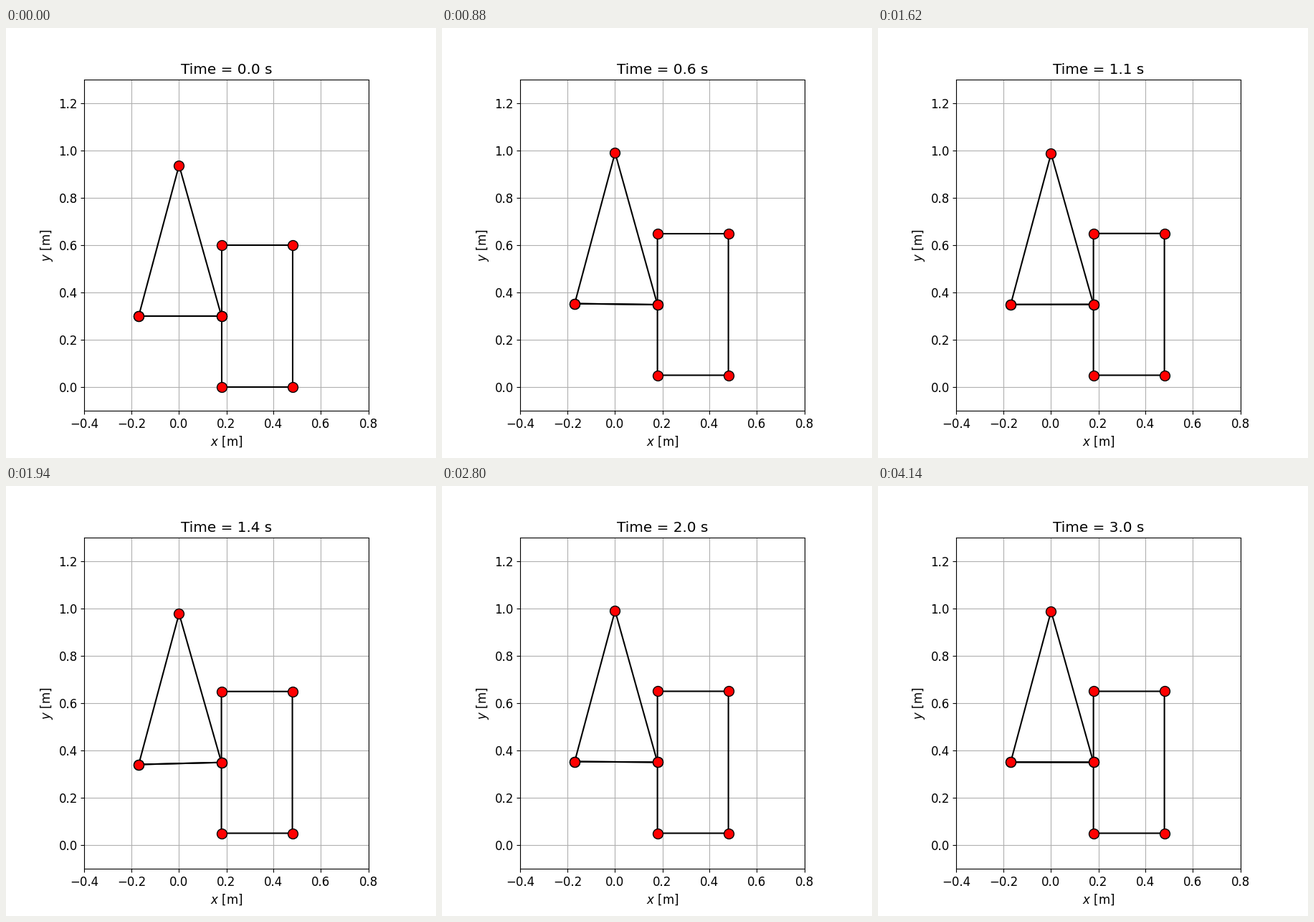
These frames come from a looping animation (600 px wide and 600 px high, 4.16 s). A matplotlib script:

```python
import numpy as np
import matplotlib.pyplot as plt
from matplotlib.animation import FuncAnimation

STEP_MS, LOOP_MS = 20, 4160

# Geometry [m]
STRUT, TILT, ARM = 0.66, np.radians(15), 0.35
PIVOT_X, MAST = -STRUT * np.sin(TILT), STRUT * np.cos(TILT)
RADIUS, WIDTH = 0.3, 0.3
BUMP, BUMP_TIME = 0.05, 0.315

# Quarter car: masses [kg], stiffness [N/m], damping [Ns/m]
BODY, WHEEL = 300.0, 51.0
SPRING, DAMPER, TYRE = 10880.0, 1135.0, 150000.0

# Linear system for (body, hub, body velocity, hub velocity)
SYSTEM = np.array([
    [0, 0, 1, 0],
    [0, 0, 0, 1],
    [-SPRING / BODY, SPRING / BODY, -DAMPER / BODY, DAMPER / BODY],
    [SPRING / WHEEL, -(SPRING + TYRE) / WHEEL, DAMPER / WHEEL, -DAMPER / WHEEL],
])
RATES, MODES = np.linalg.eig(SYSTEM)
WEIGHTS = np.linalg.solve(MODES, np.array([-BUMP, -BUMP, 0, 0], dtype=complex))


def sim_time(frame):
    """Simulated seconds; playback is slower before the bump."""
    t = np.interp(frame * STEP_MS, [0, 280, 480, 4140], [0, 0.151, 0.255, 3.0])
    return round(float(t), 6)


def heights(t):
    """Road, body pivot and hub height."""
    if t < BUMP_TIME - 1e-9:
        return 0.0, RADIUS, RADIUS
    offset = (MODES @ (WEIGHTS * np.exp(RATES * (t - BUMP_TIME)))).real
    rest = RADIUS + BUMP
    return BUMP, rest + offset[0], rest + offset[1]


plt.rcParams["font.size"] = 12
fig, ax = plt.subplots(figsize=(6, 6), dpi=100)
ax.set_aspect("equal")
ax.set_xlim(-0.4, 0.8)
ax.set_ylim(-0.1, 1.3)
ax.set_xlabel("$x$ [m]")
ax.set_ylabel("$y$ [m]")
ax.grid()
title = ax.set_title("")

style = dict(color="black", lw=1.5, marker="o", markersize=10,
             markerfacecolor="red", markeredgecolor="black")
frame_line, = ax.plot([], [], **style)
wheel_line, = ax.plot([], [], **style)


def update(frame):
    t = sim_time(frame)
    road, body, hub_y = heights(t)
    hub_x = PIVOT_X + np.sqrt(ARM**2 - (hub_y - body)**2)
    outer, top = hub_x + WIDTH, hub_y + RADIUS

    pivot, mast, hub = (PIVOT_X, body), (0, body + MAST), (hub_x, hub_y)
    frame_line.set_data(*zip(pivot, mast, hub, pivot))
    wheel_line.set_data(*zip(pivot, hub, (hub_x, top), (outer, top),
                             (outer, road), (hub_x, road), hub))
    title.set_text(f"Time = {t:.1f} s")
    return frame_line, wheel_line, title


anim = FuncAnimation(fig, update, frames=LOOP_MS // STEP_MS,
                     interval=STEP_MS, repeat=True, repeat_delay=0)
plt.show()
```
